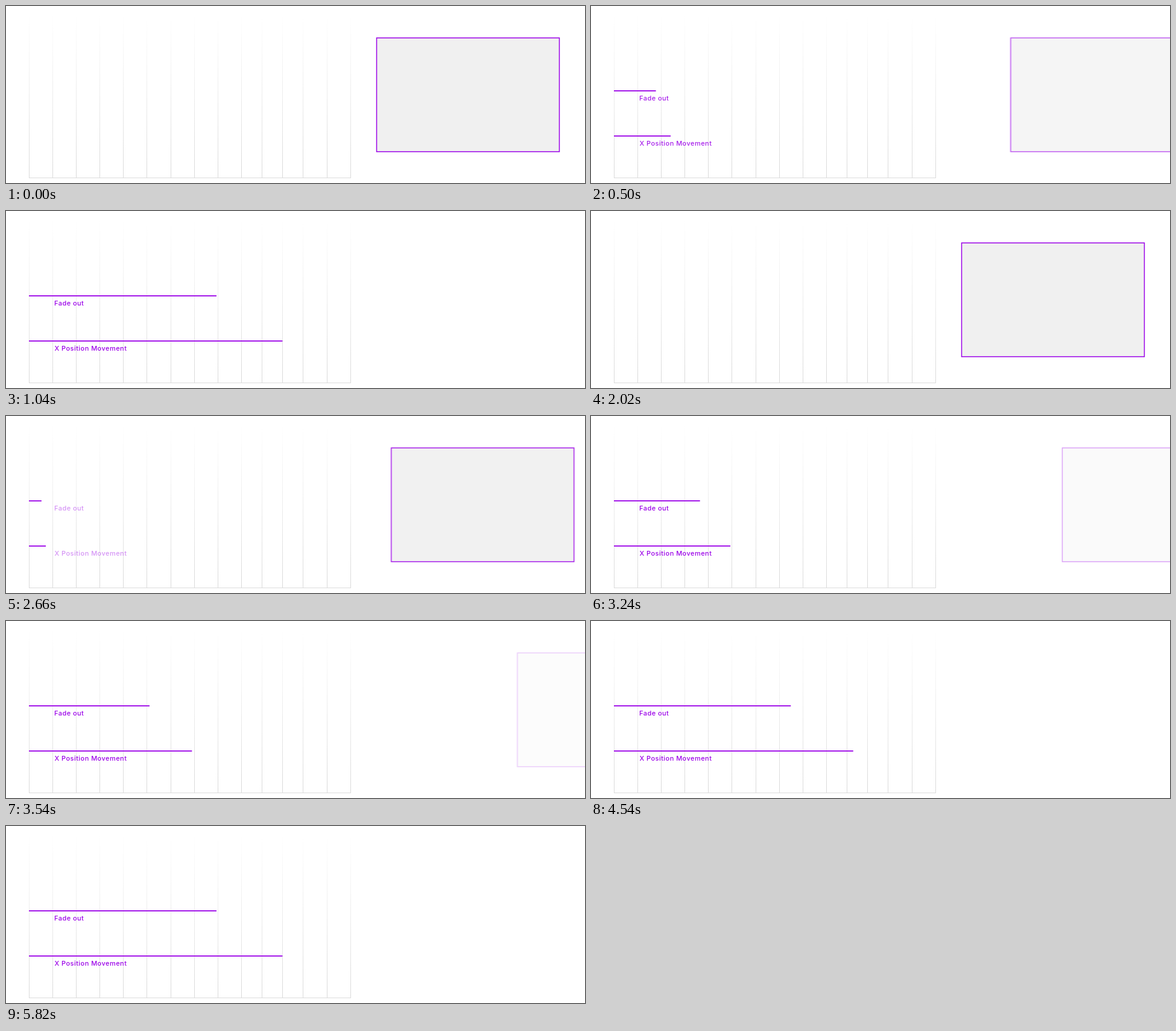
An HTML page for the animation above (5.84 s loop, 960 px wide and 294 px high).

```html
<!DOCTYPE html>
<html lang="en">
<head>
<meta charset="utf-8">
<title>Fade and movement timing</title>
<style>
  html, body {
    margin: 0;
    width: 100%;
    height: 100%;
    overflow: hidden;
    background: #fff;
  }
  svg { display: block; }

  :root {
    --accent: #9b00e8;
    --ease: cubic-bezier(.2, 0, .1, 1);
    --slide: cubic-bezier(.2, 0, .125, 1);
  }

  /* One loop: a 600 ms play at 400 ms, then a 3000 ms play at 2420 ms */
  .bar, .label, .mover, .card { animation: 5840ms linear infinite; }

  .bar {
    fill: var(--accent);
    transform-box: fill-box;
    transform-origin: left;
    animation-name: grow;
  }
  .label {
    fill: var(--accent);
    font: 500 11px Montserrat, Inter, sans-serif;
    letter-spacing: .45px;
    animation-name: appear;
  }
  .mover { animation-name: move; }
  .card {
    fill: #f0f0f0;
    stroke: var(--accent);
    stroke-width: 1.5;
    animation-name: fade;
  }

  @keyframes grow {
    0% { transform: scaleX(0); }
    6.8493% { transform: scaleX(0); animation-timing-function: var(--ease); }
    17.1233% { transform: scaleX(1); animation-timing-function: step-end; }
    34.585% { transform: scaleX(0); }
    41.4384% { transform: scaleX(0); animation-timing-function: var(--ease); }
    92.8082%, 100% { transform: scaleX(1); }
  }
  @keyframes appear {
    0%, 6.8493% { opacity: 0; }
    8.8014% { opacity: 1; animation-timing-function: step-end; }
    34.585%, 41.4384% { opacity: 0; }
    51.1986%, 100% { opacity: 1; }
  }
  @keyframes move {
    0% { transform: translateX(0); }
    6.8493% { transform: translateX(0); animation-timing-function: var(--slide); }
    17.1233% { transform: translateX(363px); animation-timing-function: step-end; }
    34.585% { transform: translateX(0); }
    41.4384% { transform: translateX(0); animation-timing-function: var(--slide); }
    92.8082%, 100% { transform: translateX(363px); }
  }
  /* The fade takes 74% of the movement time */
  @keyframes fade {
    0% { opacity: 1; }
    6.8493% { opacity: 1; animation-timing-function: var(--ease); }
    14.4521% { opacity: 0; animation-timing-function: step-end; }
    34.585% { opacity: 1; }
    41.4384% { opacity: 1; animation-timing-function: var(--ease); }
    79.4521%, 100% { opacity: 0; }
  }
</style>
</head>
<body>
<svg width="960" height="294" viewBox="0 0 960 294">
  <defs>
    <linearGradient id="rise" gradientUnits="userSpaceOnUse" x1="0" y1="14" x2="0" y2="286">
      <stop offset="0" stop-color="#d9d9d9" stop-opacity="0"/>
      <stop offset="1" stop-color="#d9d9d9"/>
    </linearGradient>
  </defs>

  <path fill="none" stroke="url(#rise)" d="M38.5 14V286M77.5 14V286M116.5 14V286M155.5 14V286M194.5 14V286
    M233.5 14V286M273.5 14V286M312.5 14V286M351.5 14V286M390.5 14V286M424.5 14V286M458.5 14V286
    M492.5 14V286M532.5 14V286M571.5 14V286"/>
  <path stroke="#dcdcdc" d="M38 285.5H572"/>

  <rect class="bar" x="38" y="140" width="311" height="1.8"/>
  <text class="label" x="80" y="157">Fade out</text>
  <rect class="bar" x="38" y="215" width="420.4" height="1.8"/>
  <text class="label" x="80.5" y="232">X Position Movement</text>

  <g class="mover">
    <rect class="card" x="614.5" y="53" width="303" height="189"/>
  </g>
</svg>
</body>
</html>
```
